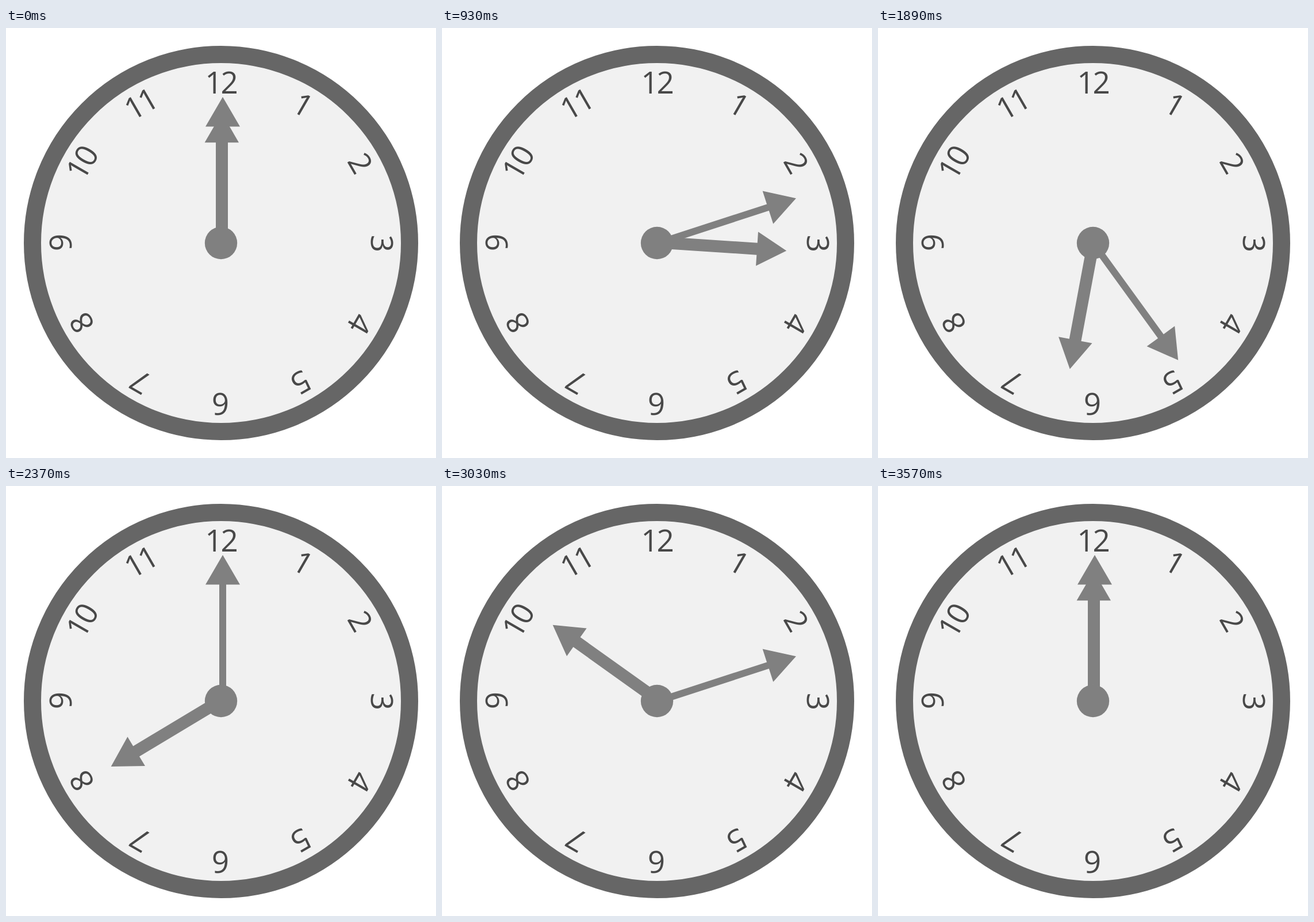
These frames come from a looping animation (748x748 px, 3600 ms). An HTML page:

```html
<!DOCTYPE html>
<html lang="en">
<head>
<meta charset="utf-8">
<title>Clock</title>
<style>
  html, body { margin: 0; width: 100%; height: 100%; overflow: hidden; background: #fff; }
  svg { display: block; width: 748px; height: 748px; }
  #numerals { font: 53px "Open Sans", "Noto Sans", sans-serif; fill: #484848; text-anchor: middle; letter-spacing: -3px; }
</style>
</head>
<body>
<svg viewBox="0 0 748 748">
  <circle cx="374" cy="374" r="328" fill="#f1f1f1" stroke="#666" stroke-width="30"/>
  <g id="numerals"></g>
  <g fill="#808080">
    <path id="hour" d="M375.4 148L405 199.3H386V374H365V199.3H345.6Z"/>
    <path id="minute" d="M377 120L407 171.5H383V374H371V171.5H347Z"/>
    <circle cx="374" cy="374" r="28.2"/>
  </g>
</svg>
<script>
const STEP = 30, STEPS = 120;
const byId = id => document.getElementById(id);
const rotate = (el, angle) => el.setAttribute('transform', `rotate(${angle} 375.2 372.5)`);

let labels = '';
for (let n = 1; n <= 12; n++) {
  labels += `<text x="${n === 1 ? 376 : 373.5}" y="113.5" transform="rotate(${n * 30} 374 374)">${n}</text>`;
}
byId('numerals').innerHTML = labels;

function draw(now) {
  const i = Math.floor(now / STEP) % STEPS;
  rotate(byId('hour'), 360 * i / (STEPS - 1));
  // The first turn of the minute hand takes nine steps, every later one ten.
  rotate(byId('minute'), i < 9 ? i * 40 : (i + 1) * 36);
  requestAnimationFrame(() => draw(performance.now()));
}
draw(performance.now());
</script>
</body>
</html>
```
